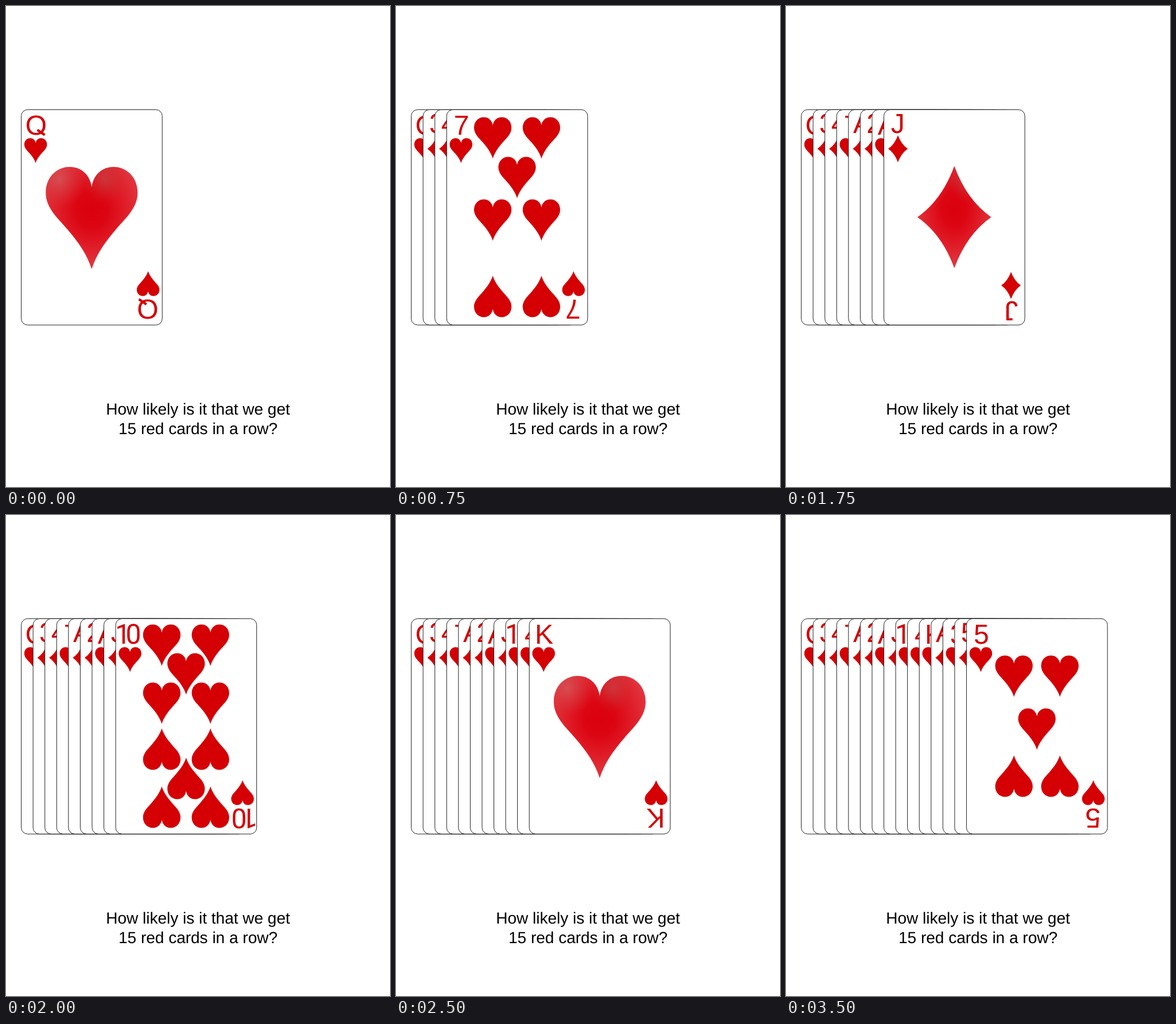
Recreate the animation shown at these times as an HTML page. Size 669 by 837 pixels, loop 4000 ms.

```html
<!DOCTYPE html>
<html lang="en">
<head>
<meta charset="utf-8">
<title>Red cards in a row</title>
<style>
  html, body { margin: 0; width: 100%; height: 100%; overflow: hidden; background: #fff; }
  svg { display: block; font-family: "Liberation Sans", Arial, sans-serif; text-anchor: middle; text-rendering: geometricPrecision; }
  .rank { font-size: 48px; fill: #d40004; }
  .ten { font-family: Roboto, sans-serif; letter-spacing: -8.5px; text-anchor: start; }
  .tail { stroke: #d40004; stroke-width: 4.2; }
  .caption { font-size: 28px; }
</style>
</head>
<body>
<svg width="669" height="837" viewBox="0 0 669 837">
  <defs>
    <path id="heart" d="M0 35C-3 14-18 0-38 0C-62 0-80 19-80 45C-80 72-58 90-42.5 108.5C-24 130-8 152 0 178C8 152 24 130 42.5 108.5C58 90 80 72 80 45C80 19 62 0 38 0C18 0 3 14 0 35Z"/>
    <path id="diamond" d="M0-41.5Q10-14 30 0Q10 14 0 41.5Q-10 14-30 0Q-10-14 0-41.5Z"/>
    <radialGradient id="body" cx=".5" cy=".42" r=".56">
      <stop offset="0" stop-color="#db000e"/>
      <stop offset=".3" stop-color="#dc0512"/>
      <stop offset="1" stop-color="#e2363f"/>
    </radialGradient>
    <radialGradient id="shineL" cx=".15" cy=".12" r=".28">
      <stop offset="0" stop-color="#d4565a" stop-opacity=".8"/>
      <stop offset="1" stop-color="#d4343a" stop-opacity="0"/>
    </radialGradient>
    <radialGradient id="shineR" cx=".64" cy=".12" r=".24">
      <stop offset="0" stop-color="#c84044" stop-opacity=".7"/>
      <stop offset="1" stop-color="#c82a2c" stop-opacity="0"/>
    </radialGradient>
  </defs>
  <g id="cards"></g>
  <g class="caption">
    <text x="334.5" y="711">How likely is it that we get</text>
    <text x="334.5" y="745">15 red cards in a row?</text>
  </g>
</svg>
<script>
  const STEP = 250, LOOP = 4000;
  const CX = 122.7, CY = 187.4;
  const deal = "Qh 3d 4d 7h Ad 2d Ah Jd 10h 4h Kh Ad 3h 5d 5h".split(" ");

  // Pip heights from the card's centre, for the middle and the two side columns
  const both = (...ys) => ys.flatMap(y => [-y, y]);
  const columns = {
    2: { mid: both(100) },
    3: { mid: [0, ...both(113)] },
    4: { side: both(87) },
    5: { side: both(87), mid: [5] },
    7: { side: [5, ...both(138)], mid: [-69] },
    10: { side: both(141, 40), mid: both(91) }
  };

  const shape = (id, x, y, sx, sy = sx, fill = "#d40004") =>
    `<use href="#${id}" transform="translate(${x} ${y}) scale(${sx} ${sy})" fill="${fill}"/>`;

  function pip(isHeart, dx, dy) {
    if (!isHeart) return shape("diamond", CX + dx, CY + dy, 1);
    const dir = dy > 9 ? -1 : 1;
    return shape("heart", CX + dx, CY + dy - 36 * dir, .408, .405 * dir);
  }

  function emblem(isHeart) {
    const [id, y, size] = isHeart ? ["heart", 100, 1] : ["diamond", CY, 2.14];
    return ["body", "shineL", "shineR"].map(g => shape(id, CX, y, size, size, `url(#${g})`)).join("");
  }

  function face(rank, isHeart) {
    if (!columns[rank]) return emblem(isHeart);
    const { side = [], mid = [] } = columns[rank];
    const gap = rank > 5 ? 42.4 : 40;
    return [
      ...side.flatMap(y => both(gap).map(x => pip(isHeart, x, y))),
      ...mid.map(y => pip(isHeart, 0, y))
    ].join("");
  }

  function corner(rank, isHeart) {
    const ten = rank === "10", queen = rank === "Q";
    const x = ten ? -1 : isHeart ? 25.8 : 24.3;
    const suit = isHeart ? shape("heart", 25, 50, .247, .243) : shape("diamond", 24.5, 68.5, .567);
    // The queen's letter is an O with a short crossing tail
    return `<text class="rank ${ten ? "ten" : ""}" x="${x}" y="${isHeart ? 43.8 : 40.5}">${queen ? "O" : rank}</text>
      ${queen ? '<path class="tail" d="M28 35.5L41 44.5"/>' : ""}${suit}`;
  }

  function card(code, i) {
    const rank = code.slice(0, -1), isHeart = code.endsWith("h");
    const mark = corner(rank, isHeart);
    return `<g transform="translate(${26.6 + 20.56 * i} 180)">
      <rect y=".4" width="245.6" height="374.7" rx="11" fill="#fff" stroke="#222"/>
      ${face(rank, isHeart)}${mark}<g transform="rotate(180 123 ${CY})">${mark}</g></g>`;
  }

  const table = document.getElementById("cards");
  table.innerHTML = deal.map(card).join("");
  const dealt = [...table.children];

  function draw() {
    const t = performance.now() % LOOP;
    dealt.forEach((el, i) => { el.style.display = t >= i * STEP ? "" : "none"; });
    requestAnimationFrame(draw);
  }
  draw();
</script>
</body>
</html>
```
